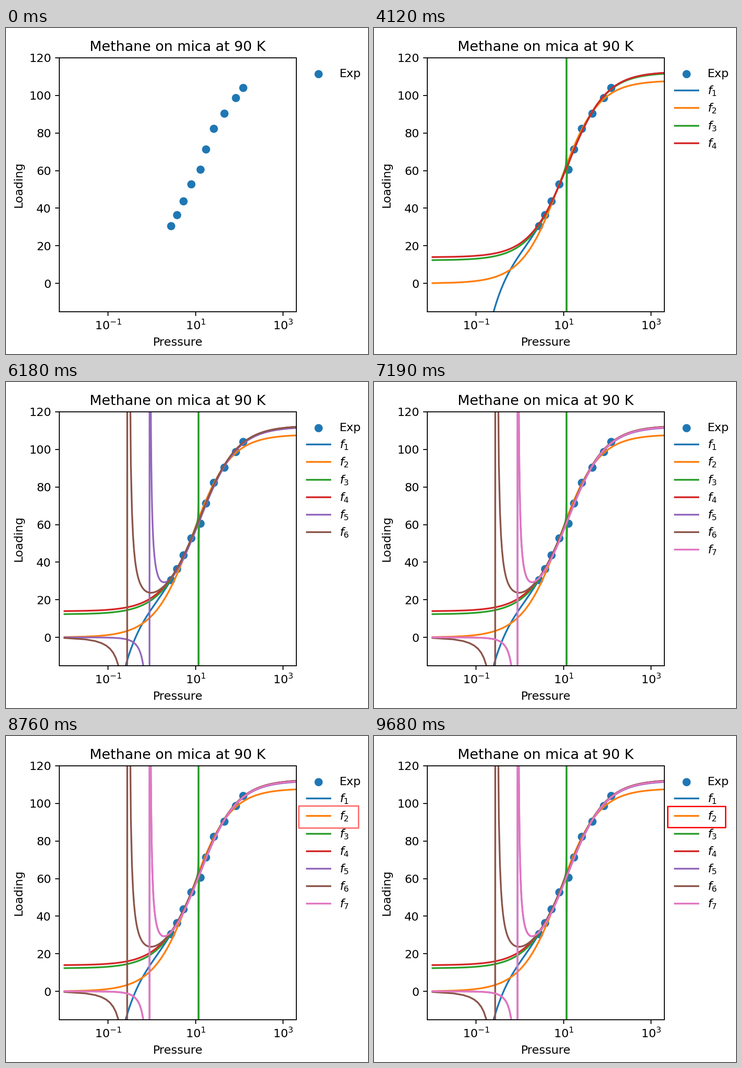
Write a matplotlib script that moves like this. It is 788 px wide and 710 px high and loops after 9.72 s.

```python
import matplotlib.pyplot as plt
import numpy as np
from matplotlib.animation import FuncAnimation
from matplotlib.patches import Rectangle

W, H = 788, 710
U = 2.54  # pixels per typographic point
STEP, LOOP = 40, 9720
FRAMES = LOOP // STEP
REVEAL = [1050, 2060, 3110, 4120, 5130, 6180, 7190]
BOX_START = 8240 // STEP

plt.rcParams.update({
    "font.family": "DejaVu Sans",
    "font.size": 10 * U,
    "axes.linewidth": 0.8 * U,
    "axes.labelpad": 4 * U,
    "axes.titlepad": 6 * U,
    "lines.linewidth": 1.5 * U,
})

# At 72 dpi one point equals one pixel.
fig = plt.figure(figsize=(W / 72, H / 72), dpi=72, facecolor="white")

LEFT, RIGHT, TOP, BOTTOM = 115.8, 631.6, 64.9, 617.6
ax = fig.add_axes([LEFT / W, 1 - BOTTOM / H, (RIGHT - LEFT) / W, (BOTTOM - TOP) / H])
ax.set_xscale("log")
ax.set(xlabel="Pressure", ylabel="Loading", title="Methane on mica at 90 K")
ax.set_xticks([0.1, 10, 1000])
ax.set_yticks(range(0, 121, 20))
ax.minorticks_off()
ax.tick_params(length=3.5 * U, width=0.8 * U, pad=3.5 * U)

# Full-stage layer in pixel coordinates, y pointing down.
over = fig.add_axes([0, 0, 1, 1])
over.axis("off")

DOT = dict(s=(6 * U) ** 2, color="C0", linewidths=U)
pressure = [2.72, 3.73, 5.23, 7.98, 12.8, 17.3, 25.8, 45.0, 82.5, 121.5]
loading = [30.7, 36.4, 43.8, 52.8, 60.7, 71.3, 82.4, 90.3, 98.8, 104.2]
ax.scatter(pressure, loading, **DOT)


def langmuir(x, top, half, base=0):
    return base + top * x / (half + x)


def rational(x, a, b, pole, s):
    return x * (a * x + b) / ((x - pole) * (x + s))


POLE = 11.7
models = [
    lambda x: langmuir(x, 95.5, 13, 17.1) - 8.5 / x,
    lambda x: langmuir(x, 107.9, 8.3),
    lambda x: langmuir(x, 99.9, 11.9, 12.2) + 1 / (POLE - x),
    lambda x: langmuir(x, 98.7, 12.5, 13.9),
    lambda x: rational(x, 112, 0, 0.878, 11.6),
    lambda x: rational(x, 112.5, 104, 0.288, 11.8),
    lambda x: rational(x, 112.3, 0, 0.878, 11.6),
]

# Even steps at low pressure, denser samples around the third model's pole.
grid = np.sort(np.concatenate([
    np.arange(0.01, 3, 0.02),
    np.geomspace(3, 2000, 600),
    POLE + np.linspace(-0.505, 0.505, 102),
]))

ROW0, ROW = 97.9, 38.2
HANDLE = (654.7, 705.6)
TEXT_X = 725.8


def label(row, text):
    return over.text(TEXT_X, ROW0 + row * ROW + 3.5 * U, text, va="baseline")


over.scatter(np.mean(HANDLE), ROW0 + 2.2, **DOT)
label(0, "Exp")

groups = []
for k, model in enumerate(models, 1):
    color = f"C{k - 1}"
    y = ROW0 + k * ROW
    curve, = ax.plot(grid, model(grid), color=color)
    handle, = over.plot(HANDLE, (y, y), color=color)
    groups.append((curve, handle, label(k, f"$f_{k}$")))

ax.set(xlim=(0.00756, 2000), ylim=(-15, 120))
over.set(xlim=(0, W), ylim=(H, 0))

CX, CY, HALF_W, HALF_H = 702.1, 176.1, 63.3, 22.9
box = Rectangle((0, 0), 1, 1, fill=False, edgecolor="red", linewidth=3,
                joinstyle="round", zorder=5)
over.add_patch(box)


def update(i):
    for start, group in zip(REVEAL, groups):
        for artist in group:
            artist.set_visible(i >= start // STEP)
    box.set_visible(i >= BOX_START)
    if i >= BOX_START:
        t = (i - BOX_START) / (FRAMES - 1 - BOX_START)
        scale = 1 + 0.058 * (1 - t) ** 1.3
        w, h = HALF_W * scale, HALF_H * scale
        box.set_bounds(CX - w, CY - h, 2 * w, 2 * h)
        box.set_alpha(min(1, 0.45 + 0.19 * t + 0.36 * t * t))
    return [box, *(a for g in groups for a in g)]


anim = FuncAnimation(fig, update, frames=FRAMES, init_func=lambda: update(0),
                     interval=STEP, repeat=True, repeat_delay=0, blit=False)
plt.show()
```
